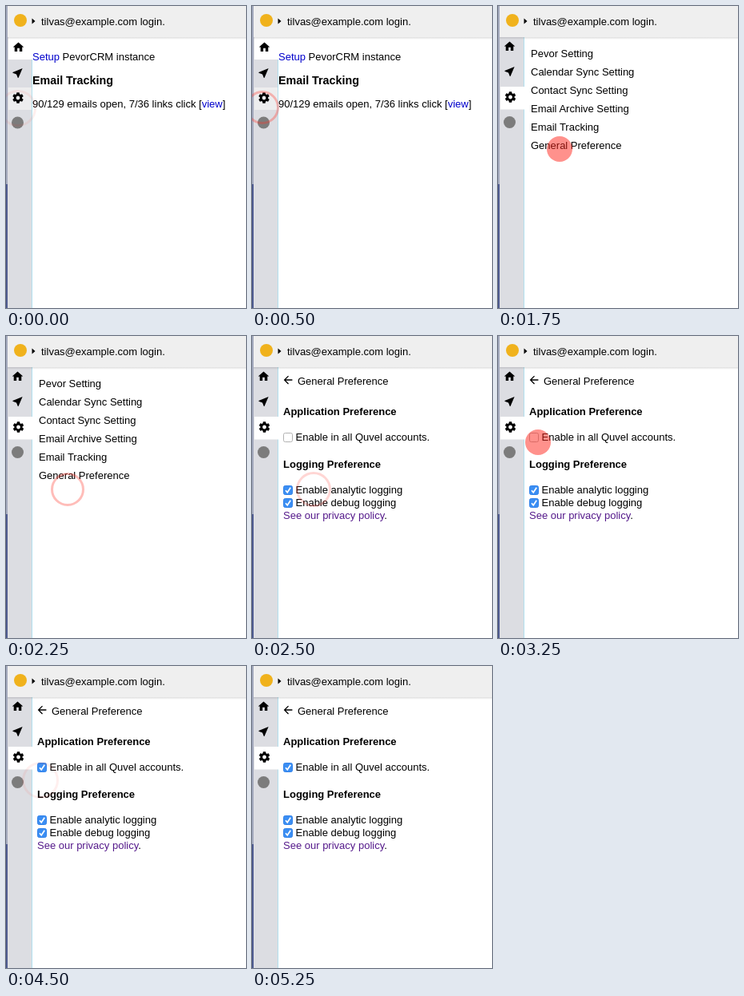
An HTML page for the animation above (6.25 s loop, 300 by 378 pixels).

```html
<!DOCTYPE html>
<html lang="en">
<head>
<meta charset="utf-8">
<title>Preference walkthrough</title>
<style>
  html, body { margin: 0; width: 100%; height: 100%; overflow: hidden; background: #fff; }
  svg { display: block; width: 100%; height: 100%; }
  text { font: 13px "Liberation Sans", Arial, sans-serif; fill: #000; white-space: pre; }
  .bold { font-weight: bold; }
  .link { fill: #0000cc; }
  .seen { fill: #551a8b; }
</style>
</head>
<body>
<svg viewBox="0 0 300 378">
  <defs>
    <linearGradient id="shade" x2="0" y2="1">
      <stop offset="0" stop-color="#000" stop-opacity=".13"/>
      <stop offset="1" stop-color="#000" stop-opacity="0"/>
    </linearGradient>
    <path id="houseIcon" d="M10 20v-6h4v6h5v-8h3L12 3 2 12h3v8z"/>
    <path id="pointIcon" d="M21 3L3 10.53v.98l6.84 2.65L12.48 21h.98L21 3z"/>
    <path id="gearIcon" d="M19.43 12.98c.04-.32.07-.64.07-.98s-.03-.66-.07-.98l2.11-1.65c.19-.15.24-.42.12-.64l-2-3.46c-.12-.22-.39-.3-.61-.22l-2.49 1c-.52-.4-1.08-.73-1.69-.98l-.38-2.65C14.46 2.18 14.25 2 14 2h-4c-.25 0-.46.18-.49.42l-.38 2.65c-.61.25-1.17.59-1.69.98l-2.49-1c-.23-.09-.49 0-.61.22l-2 3.46c-.13.22-.07.49.12.64l2.11 1.65c-.04.32-.07.65-.07.98s.03.66.07.98l-2.11 1.65c-.19.15-.24.42-.12.64l2 3.46c.12.22.39.3.61.22l2.49-1c.52.4 1.08.73 1.69.98l.38 2.65c.03.24.24.42.49.42h4c.25 0 .46-.18.49-.42l.38-2.65c.61-.25 1.17-.59 1.69-.98l2.49 1c.23.09.49 0 .61-.22l2-3.46c.12-.22.07-.49-.12-.64l-2.11-1.65zM12 15.5c-1.93 0-3.5-1.57-3.5-3.5s1.57-3.5 3.5-3.5 3.5 1.57 3.5 3.5-1.57 3.5-3.5 3.5z"/>
    <path id="backIcon" d="M20 11H7.83l5.59-5.59L12 4l-8 8 8 8 1.41-1.41L7.83 13H20v-2z"/>
  </defs>

  <rect width="300" height="378" fill="#fff"/>
  <rect x="2" y="39" width="30" height="339" fill="#dcdde2"/>
  <rect x="32" y="39" width="1" height="339" fill="#b3e0ee"/>
  <rect id="tab" x="3" width="30"/>
  <rect id="hover" x="3" y="102" width="29" height="28" fill="#ededee"/>
  <rect x="2" width="298" height="39" fill="#efefef"/>
  <rect x="2" y="39" width="298" height="3" fill="url(#shade)"/>
  <rect width="2" height="223" fill="#a3a9bd"/>
  <rect y="223" width="2" height="155" fill="#4d5a8f"/>

  <circle cx="18" cy="18" r="8" fill="#f0b21c"/>
  <path d="M32.5 15.5l4 3.5-4 3.5z"/>
  <text x="44" y="24">tilvas@example.com login.</text>
  <g id="icons"></g>

  <g id="home">
    <text x="33" y="68"><tspan class="link">Setup</tspan> PevorCRM instance</text>
    <text x="33" y="98" class="bold" style="font-size:14.3px">Email Tracking</text>
    <text x="33" y="127">90/129 emails open, 7/36 links click [<tspan class="link">view</tspan>]</text>
  </g>
  <g id="menu"></g>
  <g id="prefs">
    <use href="#backIcon" transform="translate(37 47) scale(.67)"/>
    <text x="57" y="61">General Preference</text>
    <text x="39" y="99" class="bold">Application Preference</text>
    <text x="54.5" y="131">Enable in all Quvel accounts.</text>
    <text x="39" y="165" class="bold">Logging Preference</text>
    <text x="54.5" y="197">Enable analytic logging</text>
    <text x="54.5" y="213">Enable debug logging</text>
    <text x="39" y="229"><tspan class="seen">See our privacy policy</tspan>.</text>
    <g id="boxes"></g>
  </g>
  <circle id="pointer"/>
</svg>
<script>
const LOOP = 6250, STEP = 250;
const $ = id => document.getElementById(id);
const set = (el, attrs) => { for (const k in attrs) el.setAttribute(k, attrs[k]); };
const show = (id, on) => set($(id), { display: on ? "inline" : "none" });

// Pointer stops: [step, x, y, pressed]; a click spreads a ring below the pointer.
const stops = [
  [0, 15, 112, 1], [1, 13, 111, 0], [2, 13, 111, 1], [5, 15, 116, 0],
  [6, 58, 195, 0], [7, 77, 179, 0], [8, 77, 176, 0], [9, 77, 176, 1],
  [12, 77, 174, 0], [13, 50, 133, 0], [14, 43, 128, 0], [15, 43, 127, 0],
  [16, 43, 127, 1], [19, 43, 127, 0]
];
const HIDE = 21;

const items = ["Pevor Setting", "Calendar Sync Setting", "Contact Sync Setting",
  "Email Archive Setting", "Email Tracking", "General Preference"];
$("menu").innerHTML = items.map((s, i) => `<text x="41" y="${64 + 23 * i}">${s}</text>`).join("");

const icon = (name, x, y) =>
  `<use href="#${name}Icon" transform="translate(${x} ${y}) scale(.68) translate(-12 -12)"/>`;

function drawIcons(home) {
  const y = home ? [51.5, 84, 115, 146] : [50.5, 82, 114, 145.5];
  return icon("house", home ? 15.5 : 14.5, y[0]) + icon("point", 14.5, y[1]) +
    icon("gear", home ? 15 : 15.5, y[2]) +
    `<circle cx="14.5" cy="${y[3]}" r="7.5" fill="#7c7c7c"/>`;
}

function checkbox(y, state) {
  const on = state === "on";
  const fill = on ? "#3b8ef3" : state === "down" ? "#dadada" : "#fff";
  const line = on ? "#3182ea" : state === "down" ? "#858585" : "#b2b2b2";
  return `<rect x="39.5" y="${y - 5.5}" width="11" height="11" rx="2" fill="${fill}" stroke="${line}"/>` +
    (on ? `<path d="M42 ${y + .3}l2.2 2.5 4-6" fill="none" stroke="#fff" stroke-width="1.7"/>` : "");
}

function drawPointer(step) {
  show("pointer", step < HIDE);
  const [start, x, y, pressed] = stops.filter(s => s[0] <= step).pop();
  if (!pressed) {
    set($("pointer"), { cx: x, cy: y, r: 16, fill: "rgba(255,35,25,.5)", stroke: "none" });
    return;
  }
  const age = step === 0 ? 2 : step - start;
  set($("pointer"), {
    cx: x, cy: y + 16, r: 19.5 + age, fill: "none", "stroke-width": 3,
    stroke: `rgba(255,50,40,${.32 - .12 * age})`
  });
}

let last = -1;
function render(t) {
  const step = Math.floor((t % LOOP) / STEP);
  if (step === last) return;
  last = step;
  const home = step < 3, menu = !home && step < 10;
  show("home", home);
  show("menu", menu);
  show("prefs", !home && !menu);
  show("hover", home);
  set($("tab"), { y: home ? 39 : 101, height: home ? 28 : 28.5, fill: "#fff" });
  $("icons").innerHTML = drawIcons(home);
  const state = step < 16 ? "off" : step < 17 ? "down" : "on";
  $("boxes").innerHTML = checkbox(127, state) + checkbox(193, "on") + checkbox(209, "on");
  drawPointer(step);
}

const begin = performance.now();
function tick() {
  render(performance.now() - begin);
  requestAnimationFrame(tick);
}
tick();
</script>
</body>
</html>
```
